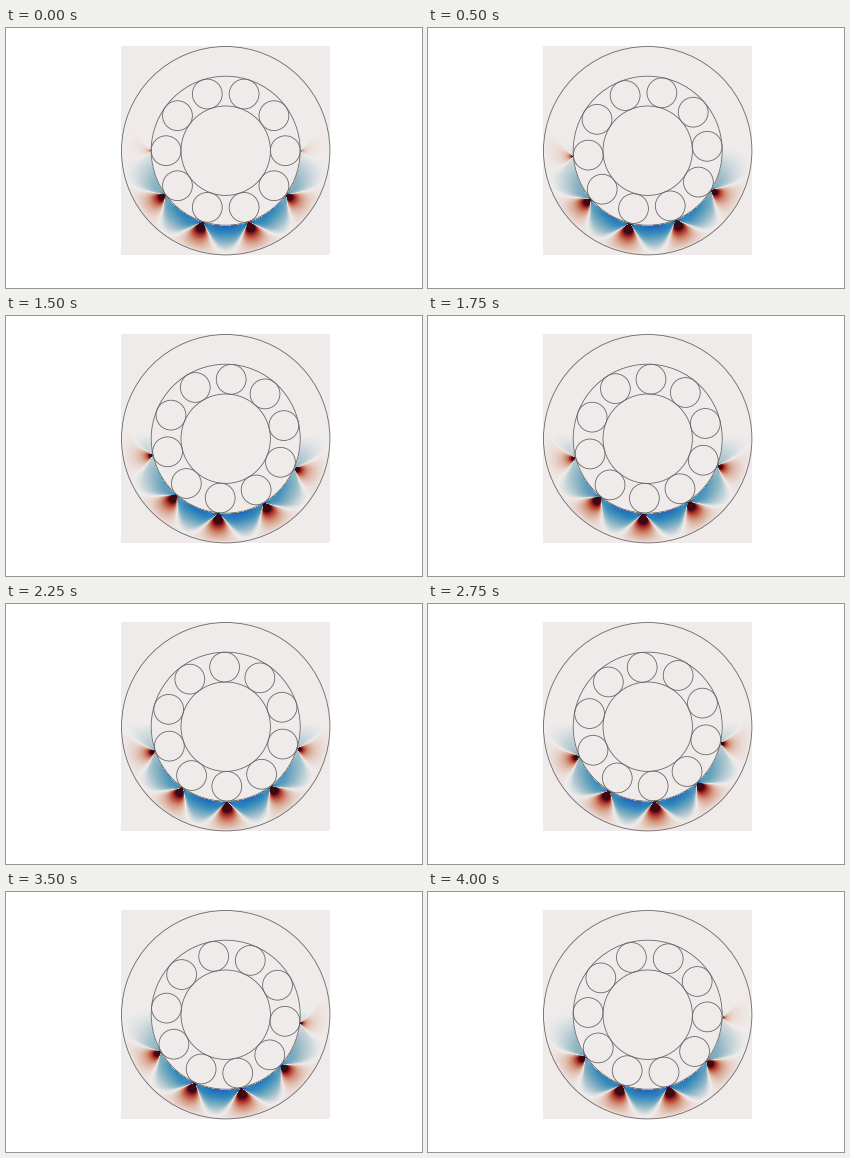
Write a matplotlib script that moves like this. It is 416x260 px and loops after 4250 ms.

```python
import numpy as np
import matplotlib.pyplot as plt
from matplotlib.animation import FuncAnimation
from matplotlib.colors import LinearSegmentedColormap
from matplotlib.patches import Circle

W, H, DPI = 416, 260, 100
CX, CY = 219.7, 122.7
R_OUT, R_RACE, R_PITCH, R_SHAFT, R_BALL = 104.2, 74.5, 59.6, 44.7, 14.9
LEFT, TOP, SIZE = 115, 18, 209
N_BALLS, N_FRAMES = 10, 17
STEP = 2 * np.pi / N_BALLS

cmap = LinearSegmentedColormap.from_list("stress", [
    "#171c42", "#154fbe", "#338abb", "#93b8c5", "#f0eceb",
    "#d7a28d", "#bd5138", "#8c1a28", "#3c0911"], N=512)

# Polar coordinates of the pixels; phi is measured from straight down
cells = np.arange(SIZE) + 0.5
px, py = np.meshgrid(LEFT + cells - CX, TOP + cells - CY)
rad, phi = np.hypot(px, py), np.arctan2(px, py)
depth = np.clip(rad - R_RACE, 0.01, None)
fade = np.clip(1 - depth / (R_OUT - R_RACE), 0, 1)
ring = (rad > R_RACE + 0.5) & (rad < R_OUT)


def load(angle):
    return np.maximum(0, (np.cos(angle) + 0.04) / 1.04)


def ball_angles(i):
    return (np.arange(N_BALLS) - 0.5 + i / N_FRAMES) * STEP


def stress(i):
    """Red lobes under the loaded balls, compression between them."""
    lobes = np.zeros_like(rad)
    gap = np.ones_like(rad)
    for a in ball_angles(i):
        turn = (phi - a + np.pi) % (2 * np.pi) - np.pi
        s = R_RACE * turn
        t = np.arctan2(s, depth)
        lobe = np.cos(t) * np.tanh(2.5 * np.cos(2 * t)) / np.hypot(s, depth)
        lobe = np.maximum(lobe, 0.2 * lobe)
        lobes += 17 * load(a) * lobe * np.exp(-(s / 30) ** 2)
        gap -= 0.5 * np.exp(-(s / 10) ** 2)
    base = 0.68 * load(phi) * gap * fade ** 1.2
    return np.where(ring, lobes * fade ** 0.6 - base, 0)


fig = plt.figure(figsize=(W / DPI, H / DPI), dpi=DPI, facecolor="white")
ax = fig.add_axes([0, 0, 1, 1])
ax.set(xlim=(0, W), ylim=(H, 0))
ax.axis("off")

field = ax.imshow(stress(0), cmap=cmap, vmin=-1, vmax=1, interpolation="nearest",
                  extent=(LEFT, LEFT + SIZE, TOP + SIZE, TOP), aspect="auto")


def outline(r):
    return ax.add_patch(Circle((CX, CY), r, fill=False, ec="#686868", lw=0.6))


for r in (R_OUT, R_RACE, R_SHAFT):
    outline(r)
balls = [outline(R_BALL) for _ in range(N_BALLS)]


def update(i):
    field.set_data(stress(i))
    for ball, a in zip(balls, ball_angles(i)):
        ball.center = CX + R_PITCH * np.sin(a), CY + R_PITCH * np.cos(a)
    return [field, *balls]


anim = FuncAnimation(fig, update, frames=N_FRAMES, interval=250, repeat=True,
                     repeat_delay=0, blit=False)
plt.show()
```
